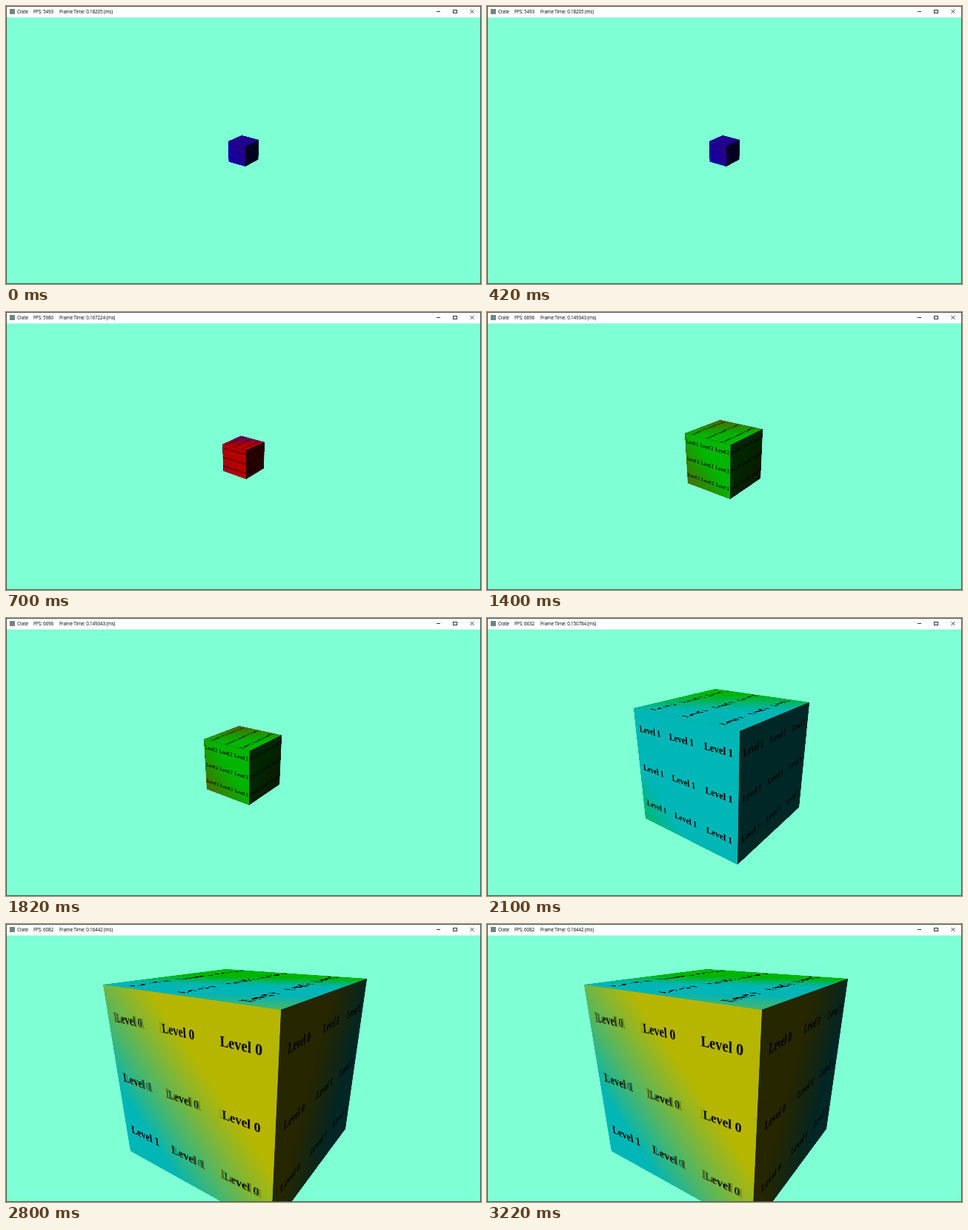
An HTML page for the animation above (3.5 s loop, 641 by 376 pixels).

```html
<!DOCTYPE html>
<html lang="en">
<head>
<meta charset="utf-8">
<title>Crate</title>
<style>
  html, body { margin: 0; width: 100%; height: 100%; overflow: hidden; }
  #stage { position: absolute; left: 0; top: 0; width: 641px; height: 376px; overflow: hidden; background: #7fffd4; }
  #stage > *, .scene > * { position: absolute; left: 0; top: 0; }
  .bar { width: 641px; height: 15px; background: #fff; border-bottom: 1px solid #bfffea; }
  .border { width: 639px; height: 374px; border: 1px solid #44584f; }
  .scene { width: 641px; height: 376px; visibility: hidden; animation: show 3.5s step-end infinite; }
  @keyframes show {
    0% { visibility: visible; }
    20%, 100% { visibility: hidden; }
  }
  .label { font: 6.4px/16px "Open Sans", "Noto Sans", sans-serif; letter-spacing: -.2px; color: #000; white-space: pre; }
  .face { transform-origin: 0 0; overflow: hidden; }
  .mip {
    position: absolute; inset: 0; display: grid; place-items: center;
    grid-template: repeat(3, minmax(0, 1fr)) / repeat(3, minmax(0, 1fr));
    font-family: "Liberation Serif", "Times New Roman", serif; font-weight: bold;
    line-height: 1; white-space: nowrap;
  }
  .mip > div { padding-bottom: .3em; }
</style>
</head>
<body>
<div id="stage">
  <div class="bar"></div>
  <svg width="641" height="376" shape-rendering="crispEdges">
    <rect x="5" y="4" width="7" height="7" fill="#70857f"/>
    <g fill="none" stroke="#333">
      <path d="M581 7.5h5M603.5 5.5h5v4h-5z"/>
      <path d="M626.5 5l5 5m0-5l-5 5" shape-rendering="auto" stroke-width=".9"/>
    </g>
  </svg>
</div>
<script>
const stage = document.getElementById('stage');

// Mip levels: colour, text size relative to the face width, text opacity
const MIPS = [
  { rgb: [255, 255, 0], size: .064, ink: 1 },
  { rgb: [0, 255, 255], size: .078, ink: 1 },
  { rgb: [0, 255, 0], size: .092, ink: 1 },
  { rgb: [255, 0, 0], size: .106, ink: .9 },
  { rgb: [0, 0, 255], size: .107, ink: .25 }
];

// Corner indices (top-left, top-right, bottom-right, bottom-left) and light per face
const FACES = {
  top: { corners: [0, 1, 2, 3], light: .71 },
  right: { corners: [3, 2, 6, 5], light: .15 },
  front: { corners: [0, 3, 5, 4], light: .715 }
};

// Corners: top left, back, right, front, then bottom left, front, right.
// Each face lists its mip layers from the bottom up, as [level, mask].
const SCENES = [
  {
    fps: 5493, ms: '0.18205', size: 30,
    points: [[300, 183], [318, 175], [341, 181], [323, 190], [300.6, 210.5], [323, 217], [340.4, 207.5]],
    top: [[4], [3, '90deg, #0003, #0003']],
    right: [[4], [3, '90deg, #0002, #0002']],
    front: [[4], [3, '47deg, #0001, #0004']]
  },
  {
    fps: 5980, ms: '0.167224', size: 42,
    points: [[292, 179], [317, 167.5], [349, 176], [324, 187.3], [293.5, 215], [324, 226], [347.7, 211.5]],
    top: [[4], [3, '50deg, #000 35%, #0007']],
    right: [[3]],
    front: [[4], [3, '47deg, #000d, #000 50%']]
  },
  {
    fps: 6696, ms: '0.149343', size: 84,
    points: [[267, 164], [314.5, 146], [372, 158.5], [328.6, 180], [271, 231.5], [328, 253], [369, 225]],
    top: [[3], [2, '50deg, #000 35%, #0008']],
    right: [[3], [2, '135deg, #000 35%, #0009']],
    front: [[3], [2, '47deg, #0009, #000 58%']]
  },
  {
    fps: 6632, ms: '0.150784', size: 220,
    points: [[198, 122], [308, 96], [435, 114], [341, 153], [214, 271], [338, 333.5], [421, 256]],
    top: [[2], [1, '55deg, #000 38%, #0000 82%']],
    right: [[1]],
    front: [[2], [1, '45deg, #0009, #000 26%']]
  },
  {
    fps: 6082, ms: '0.16442', size: 360,
    points: [[131, 82], [297, 61], [487, 74], [371, 116], [168, 307], [357.7, 413], [458, 277]],
    top: [[2], [1, '63deg, #000 40%, #0000 66%'], [0, '63deg, #0006, #0000 20%']],
    right: [[1], [0, '115deg, #000 32%, #0000 76%']],
    front: [[1], [0, '47deg, #0000 20%, #000 67%']]
  }
];

function add(parent, cls, style = {}, text = '') {
  const el = document.createElement('div');
  el.className = cls;
  el.textContent = text;
  Object.assign(el.style, style);
  return parent.appendChild(el);
}

const shade = (level, light) => `rgb(${MIPS[level].rgb.map(c => Math.round(c * light))})`;

// Projective transform of a square of the given size onto four corners
function project([[x0, y0], [x1, y1], [x2, y2], [x3, y3]], size) {
  const ax = x1 - x2, ay = y1 - y2, bx = x3 - x2, by = y3 - y2;
  const sx = x0 - x1 + x2 - x3, sy = y0 - y1 + y2 - y3;
  const det = ax * by - bx * ay;
  const g = (sx * by - bx * sy) / det, k = (ax * sy - sx * ay) / det;
  const m = [
    (x1 - x0 + g * x1) / size, (y1 - y0 + g * y1) / size, 0, g / size,
    (x3 - x0 + k * x3) / size, (y3 - y0 + k * y3) / size, 0, k / size,
    0, 0, 1, 0,
    x0, y0, 0, 1
  ];
  return `matrix3d(${m.map(n => n.toFixed(9))})`;
}

function addFace(scene, layers, quad, light, size) {
  const face = add(scene, 'face', {
    width: size + 'px', height: size + 'px', transform: project(quad, size)
  });
  for (const [level, mask] of layers) {
    const { size: em, ink } = MIPS[level];
    const fade = mask ? `linear-gradient(${mask})` : 'none';
    const mip = add(face, 'mip', {
      background: shade(level, light), color: `rgba(0, 0, 0, ${ink})`,
      fontSize: em * size + 'px', webkitMaskImage: fade, maskImage: fade
    });
    for (let i = 0; i < 9; i++) add(mip, '', {}, 'Level ' + level);
  }
}

SCENES.forEach((s, i) => {
  const scene = add(stage, 'scene', { animationDelay: i * 700 - 3500 + 'ms' });
  const faces = Object.entries(FACES).map(([name, { corners, light }]) =>
    ({ layers: s[name], light, quad: corners.map(c => s.points[c]) }));

  // Solid underlay keeps the seams between faces closed
  const solid = faces.map(f =>
    `<polygon points="${f.quad.join(' ')}" fill="${shade(f.layers[0][0], f.light)}"/>`);
  scene.innerHTML = `<svg width="641" height="376" shape-rendering="crispEdges">${solid.join('')}</svg>`;

  for (const f of faces) addFace(scene, f.layers, f.quad, f.light, s.size);
  add(scene, 'label', { left: '15px' }, 'Crate');
  add(scene, 'label', { left: '37px' }, 'FPS: ' + s.fps);
  add(scene, 'label', { left: '72px' }, `Frame Time: ${s.ms} (ms)`);
});
add(stage, 'border');
</script>
</body>
</html>
```
